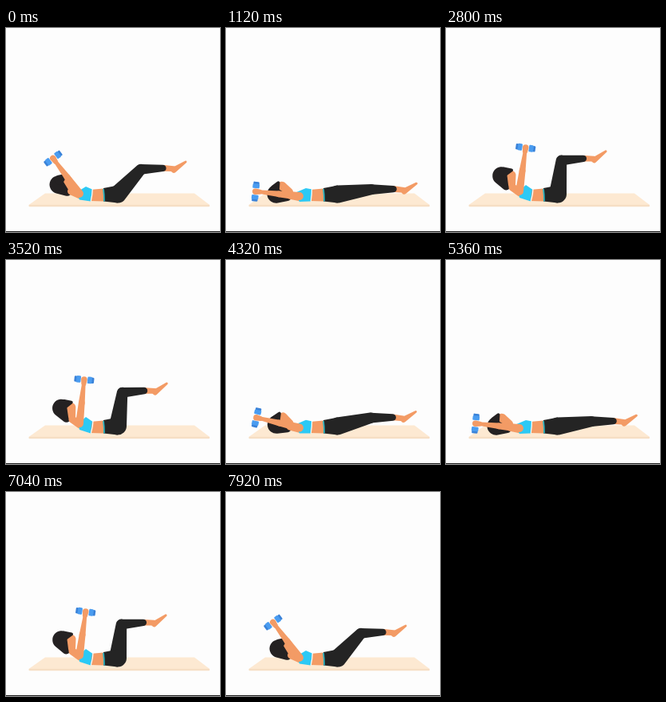
An HTML page with a canvas for the animation above (8 s loop, 268 by 256 pixels).

```html
<!DOCTYPE html>
<html lang="en">
<head>
<meta charset="utf-8">
<title>Mat exercise</title>
<style>
  html, body { margin: 0; width: 100%; height: 100%; overflow: hidden; background: #fdfdfd; }
  canvas { display: block; width: 268px; height: 256px; }
</style>
</head>
<body>
<canvas id="stage"></canvas>
<script>
const W = 268, H = 256, LOOP = 8000, CYCLE = 3960, STEP = 80;
const SKIN = '#f39b65', HAIR = '#242122', PANTS = '#242424';
const TOP = '#2cc9f5', BAND = '#2bb0bd', BLUE = '#4a9cf0', BLUE_DARK = '#3a82d8';

const canvas = document.getElementById('stage');
const ctx = canvas.getContext('2d');
const ratio = window.devicePixelRatio || 1;
canvas.width = W * ratio;
canvas.height = H * ratio;

const rad = deg => deg * Math.PI / 180;
const mix = (a, b, p) => a + (b - a) * p;
const reach = ([x, y], deg, len) =>
  [x + Math.cos(rad(deg)) * len, y - Math.sin(rad(deg)) * len];

function ease(t, start, end) {
  const u = Math.min(1, Math.max(0, (t - start) / (end - start)));
  return 0.5 - 0.5 * Math.cos(Math.PI * u);
}

// 0 = stretched out flat, 1 = curled up
function curl(t) {
  const c = t % CYCLE;
  const lower = c < 2970 ? c : c - CYCLE;
  return lower < 1000 ? 1 - ease(lower, -540, 560) : ease(c, 1515, 2440);
}

function poly(color, pts) {
  ctx.fillStyle = color;
  ctx.beginPath();
  pts.forEach(([x, y]) => ctx.lineTo(x, y));
  ctx.closePath();
  ctx.fill();
}

// Tapered capsule from a (radius ra) to b (radius rb)
function limb(color, a, ra, b, rb) {
  const dir = Math.atan2(b[1] - a[1], b[0] - a[0]);
  const side = Math.acos((ra - rb) / Math.hypot(b[0] - a[0], b[1] - a[1]));
  ctx.fillStyle = color;
  ctx.beginPath();
  ctx.arc(a[0], a[1], ra, dir + side, dir - side + 2 * Math.PI);
  ctx.arc(b[0], b[1], rb, dir - side, dir + side);
  ctx.closePath();
  ctx.fill();
}

function box(color, x, y, w, h, r) {
  ctx.fillStyle = color;
  ctx.beginPath();
  ctx.roundRect(x, y, w, h, r);
  ctx.fill();
}

// Upright seam, bowed to the right
function seam(color, width, x1, x2) {
  ctx.strokeStyle = color;
  ctx.lineWidth = width;
  ctx.beginPath();
  ctx.moveTo(x1, 202);
  ctx.quadraticCurveTo(Math.max(x1, x2), 209, x2, 217.5);
  ctx.stroke();
}

function local([x, y], deg, draw) {
  ctx.save();
  ctx.translate(x, y);
  ctx.rotate(rad(deg));
  draw();
  ctx.restore();
}

function drawMat() {
  poly('#fde9d2', [[49, 207.5], [236, 207.5], [255, 222], [28.5, 222]]);
  box('#f6dec4', 28.5, 221.8, 226.5, 2.4, 1);
  ctx.fillStyle = '#1c1c1c';
  ctx.fillRect(0, 255, W, 1);
}

function drawHead(p) {
  local([67 + 5.5 * p, 208 - 19.5 * p], mix(-50, 0, p), () => {
    limb(HAIR, [-3, -3], 11.3, [3, 10], 5);
    limb(SKIN, [9.5, -4], 5.5, [10, 8], 4.5);
    limb(HAIR, [0, -8], 6, [9.5, -10], 2);
  });
}

function drawTorso(p) {
  const shoulder = [92, mix(211, 205, p)];
  limb(SKIN, [mix(80, 83, p), mix(210, 200, p)], 4.5, [93, shoulder[1] + 1], 5.5);
  poly(SKIN, [[105, 203], [122, 201.5], [122, 217.5], [105, 217]]);
  poly(TOP, [[mix(86, 91, p), mix(207, 205, p)], [100, mix(201, 197, p)],
    [108, 202.5], [106, 217.5], [92, mix(218, 213, p)]]);
  seam('#fff', 1.2, mix(107.5, 109, p), 106.3);
  return shoulder;
}

function drawLeg(p) {
  const hip = [140, 208.5];
  const shin = mix(1, 5, p);
  const knee = reach(hip, mix(8, 84, p), 42.5);
  const ankle = reach(knee, shin, 31.5);

  local(ankle, -shin, () => {
    limb(SKIN, [-3, 0], 3.8, [9, 1.5], 3.4);
    limb(SKIN, [9.5, 3], 3.6, [25, -6.5], 1.4);
  });
  limb(PANTS, knee, 6.4, reach(knee, shin, 27.5), 4.2);
  limb(PANTS, hip, 11, knee, 6.7);
  poly(PANTS, [[122, 201], [140, 197.5], [140, 219.5], [122, 217.5]]);
  seam(BAND, 1.8, 122, 123);
}

function drawArm(p, shoulder) {
  local(shoulder, mix(6, 98, p) - 90, () => {
    limb(SKIN, [0, 0], 5, [0, -26], 3.9);
    limb(SKIN, [0, -26], 3.9, [0, -48], 2.4);
    for (const side of [-1, 1]) {
      box(BLUE_DARK, side * 10.6 - 1.8, -59, 3.6, 7.4, 1.2);
      box(BLUE, side * 7 - 2.8, -59.6, 5.6, 8.6, 1.2);
    }
    limb(SKIN, [0, -50], 3, [0, -55.5], 3.8);
  });
}

function draw(t) {
  const p = curl(t);
  ctx.setTransform(ratio, 0, 0, ratio, 0, 0);
  ctx.fillStyle = '#fdfdfd';
  ctx.fillRect(0, 0, W, H);
  drawMat();
  drawHead(p);
  const shoulder = drawTorso(p);
  drawLeg(p);
  drawArm(p, shoulder);
}

const start = performance.now();
function tick() {
  const t = (performance.now() - start) % LOOP;
  draw(Math.floor(t / STEP) * STEP);
  requestAnimationFrame(tick);
}
tick();
</script>
</body>
</html>
```
